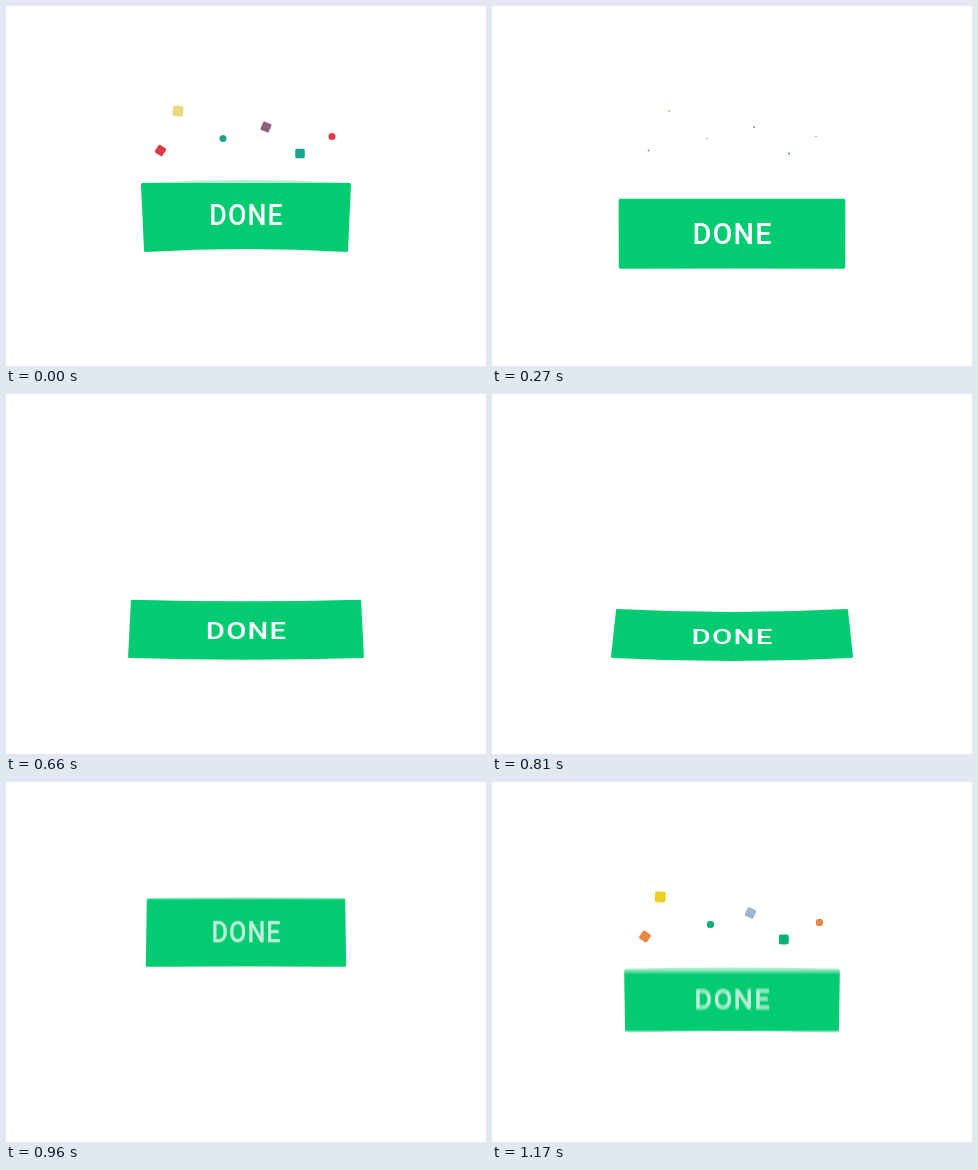
Write an HTML page with a canvas that moves like this. It is 480 px wide and 360 px high and loops after 1.2 s.

```html
<!DOCTYPE html>
<html lang="en">
<head>
<meta charset="utf-8">
<title>Done button</title>
<style>
  html, body { margin: 0; width: 100%; height: 100%; overflow: hidden; background: #fff; }
  canvas { display: block; }
</style>
</head>
<body>
<canvas id="stage" width="480" height="360"></canvas>
<script>
const ctx = document.getElementById('stage').getContext('2d');
const LOOP = 1200, STEP = 30, CENTER = 240, GREEN = '#02cb72';
const CROUCH = 600, TAKEOFF = 866, APEX = 979, LANDING = 1092, REBOUND = 1110;

// top, height, half width, bottom flare, bend
const REST = [194, 70, 114, 0, 0];
const SQUASH = [215, 49, 116, 5, 3];
const RECOIL = [177, 69, 105, -3, -3];

const RED = ['#e9883f', '#db3a48', '#e16b4c'];
const TEAL = ['#08b273', '#18a38f', '#03c274'];
const YELLOW = ['#efcd22', '#ebd981', '#e29445'];
const PURPLE = ['#9bb8d3', '#8f637f', '#966872'];

// x, y, size, angle, colours while rising, on top and fading
const confetti = [
  [172, 105, 10.5, 3, YELLOW],
  [154.5, 144.5, 9, 33, RED],
  [217, 132.5, 7, 0, TEAL],
  [260, 121, 9, 24, PURPLE],
  [294, 147.5, 9.5, 0, TEAL],
  [326, 130.5, 7, 0, RED],
];

const clamp = v => Math.max(0, Math.min(1, v));
const easeOut = u => 1 - (1 - u) ** 2;
const smooth = u => u * u * (3 - 2 * u);
const mix = (a, b, u) => a.map((v, i) => v + (b[i] - v) * u);

function pose(t) {
  if (t < CROUCH) return mix(REST, RECOIL, t < 420 ? Math.exp(-t / 100) : 0);
  if (t < TAKEOFF) return mix(REST, SQUASH, easeOut(clamp((t - CROUCH) / 180)));
  if (t > LANDING) return mix(SQUASH, RECOIL, smooth(clamp((t - REBOUND) / (LOOP - REBOUND))));
  const slim = (t - 900) / STEP;
  return [113 + .008 * (t - APEX) ** 2, 71 - .8 * slim, 101 - .9 * slim, 1, -slim / 3];
}

// Vertical speed in pixels per millisecond
function speed(t) {
  const a = Math.max(0, t - 2), b = Math.min(LOOP, t + 2);
  return (pose(b)[0] - pose(a)[0]) / (b - a);
}

function drawPanel([top, height, half, flare, bend], radius, fill) {
  const upper = half - radius, lower = upper + flare;
  const y0 = top + radius, y1 = top + height - radius;
  ctx.beginPath();
  ctx.moveTo(CENTER - upper, y0);
  ctx.quadraticCurveTo(CENTER, y0 + 2 * bend, CENTER + upper, y0);
  ctx.lineTo(CENTER + lower, y1);
  ctx.quadraticCurveTo(CENTER, y1 + 2 * bend, CENTER - lower, y1);
  ctx.closePath();
  ctx.fillStyle = ctx.strokeStyle = fill;
  ctx.lineJoin = 'round';
  ctx.lineWidth = 2 * radius;
  ctx.fill();
  ctx.stroke();
}

function gradient(top, height, ...stops) {
  const fill = ctx.createLinearGradient(0, top, 0, top + height);
  for (const [at, colour] of stops) fill.addColorStop(at, colour);
  return fill;
}

function panelFill([top, height], blur, rising) {
  if (!blur) return GREEN;
  const tail = rising ? blur / 2 : 0;
  return gradient(top, height,
    [0, '#b4ecd2'], [blur / height, GREEN],
    [1 - tail / height, GREEN], [1, tail ? '#d5f5e5' : GREEN]);
}

function drawLabel([top, height, half, , bend], blur) {
  const copies = blur < 1 ? 1 : 13;
  ctx.font = '500 29px Roboto, sans-serif';
  ctx.letterSpacing = '1.2px';
  ctx.textAlign = 'center';
  ctx.fillStyle = '#fff';
  for (let i = 0; i < copies; i++) {
    const shift = copies > 1 ? (i / (copies - 1) - .5) * blur * .65 : 0;
    ctx.save();
    ctx.globalAlpha = copies > 1 ? .1 : 1;
    ctx.translate(CENTER, top + height / 2 + bend + shift);
    ctx.scale(half / 114, height / 70);
    ctx.fillText('DONE', .6, 10.3);
    ctx.restore();
  }
}

// Pale streak left below the panel on a fast rise
function drawTrail([top, height, half, flare], length) {
  const bottom = top + height;
  drawPanel([top + length, height, half, flare, 2], 4,
    gradient(bottom, length, [0, '#f0f5f2'], [.5, '#ebf2ed'], [1, '#d3dbd2']));
  ctx.fillStyle = '#fff';
  ctx.beginPath();
  ctx.ellipse(CENTER, bottom + 7, 62, 7, 0, 0, 7);
  ctx.fill();
}

function drawConfetti(t) {
  if (t < -60 || t >= 300) return;
  const scale = t < 0 ? 1 : clamp((300 - t) / 200);
  const back = Math.max(0, -t / 30);
  for (const [x, y, size, angle, [rising, top, fading]] of confetti) {
    const drift = (size - 8) * 1.5;
    ctx.save();
    ctx.translate(x + drift * (t < 0 ? t / 30 : t / 200), y + 5 * back * (1 + back));
    ctx.rotate((angle - t / 30) * Math.PI / 180);
    ctx.scale(scale, scale);
    ctx.beginPath();
    ctx.roundRect(-size / 2, -size / 2, size, size, size < 8 ? size / 2 : 1.5);
    ctx.fillStyle = top;
    ctx.fill();
    ctx.globalAlpha = clamp(t < 0 ? back : t / 120);
    ctx.fillStyle = t < 0 ? rising : fading;
    ctx.fill();
    ctx.restore();
  }
}

function draw(now) {
  const t = Math.floor(now % LOOP / STEP) * STEP;
  const panel = pose(t), v = speed(t);
  const blur = Math.max(0, 14 * Math.abs(v) - 2);
  ctx.fillStyle = '#fff';
  ctx.fillRect(0, 0, 480, 360);
  drawConfetti(t > CROUCH ? t - LOOP : t);
  if (v < -1) drawTrail(panel, -18 * v);
  drawPanel(panel, 1.5 + blur / 6, panelFill(panel, blur, v < 0));
  drawLabel(panel, blur);
}

const start = performance.now();
function tick() {
  draw(performance.now() - start);
  requestAnimationFrame(tick);
}
tick();
</script>
</body>
</html>
```
